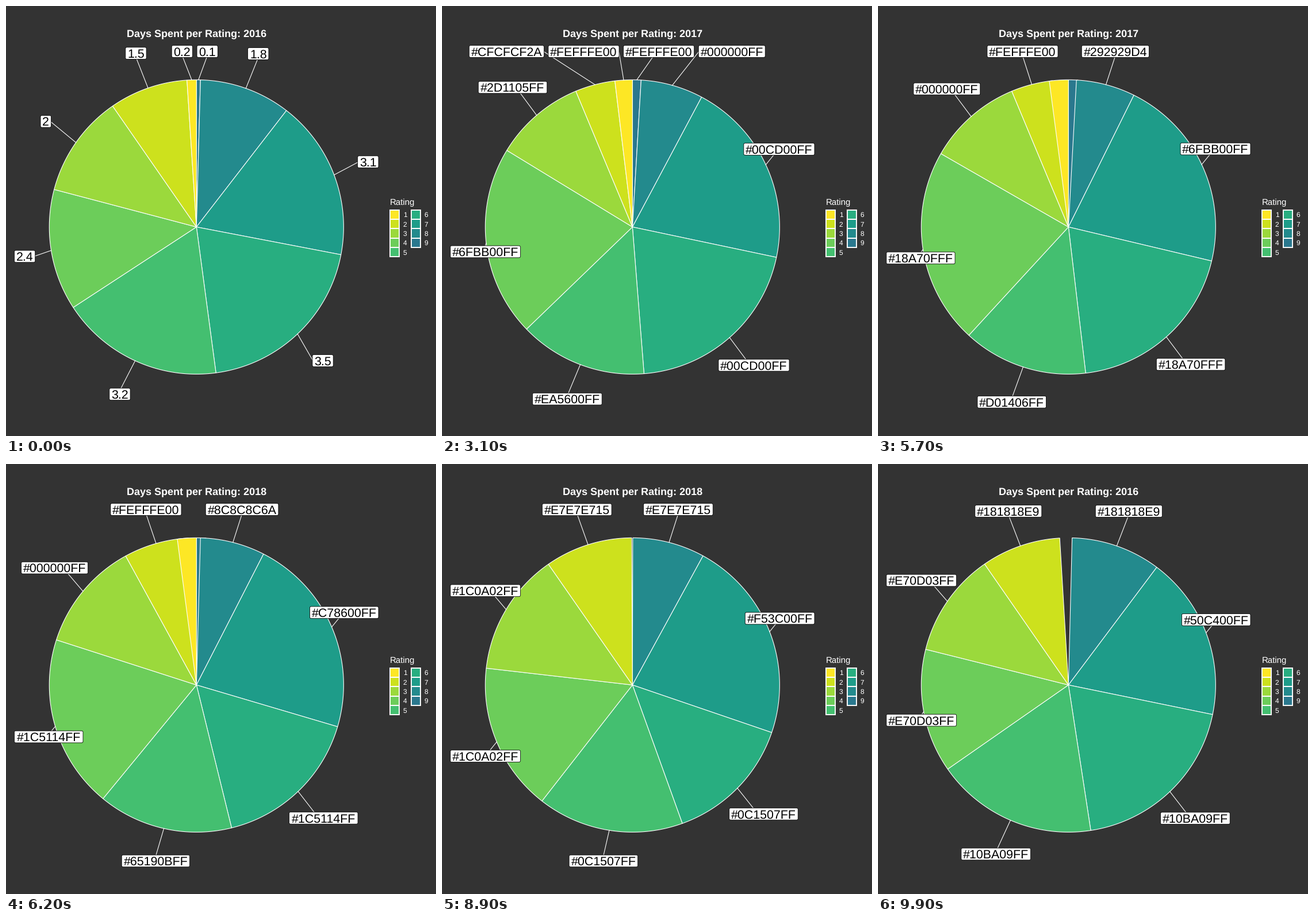
A matplotlib script that plays this animation: 748x748 px, repeating every 10 s.

```python
import numpy as np
import matplotlib.pyplot as plt
from matplotlib.animation import FuncAnimation
from matplotlib.patches import FancyBboxPatch, Polygon, Rectangle

plt.rcParams["text.hinting"] = "none"

SIZE, DPI, FRAMES, INTERVAL = 748, 100, 100, 100
PX = 72 / DPI                      # points per pixel
CX, CY, R = 331.3, 384.4, 256
FONT = "Liberation Sans"
EM, PAD, BOX_H = 21.4, 3.3, 20.8   # label text size, side padding, box height
GAP, CLEARANCE = 7.5, 15           # between labels, between label centre and its point
LEFT, RIGHT, TOP, BOTTOM = 14.4, 648, 79, 690.5

# Days per year for ratings 9 down to 1; zero means no slice.
RATINGS = range(9, 0, -1)
DAYS = {
    2016: (0.077, 1.787, 3.123, 3.537, 3.188, 2.369, 2.003, 1.534, 0.183),
    2017: (0.159, 0.951, 3.230, 3.145, 2.030, 3.435, 1.491, 0.541, 0.318),
    2018: (0, 0.724, 2.125, 1.287, 1.486, 1.549, 1.283, 0.906, 0),
}
YEARS = tuple(DAYS)
EDGES = {y: 360 * np.cumsum((0,) + d) / sum(d) for y, d in DAYS.items()}
COLORS = {r: plt.cm.viridis(1 - 0.075 * (r - 1)) for r in RATINGS}
TWEEN_STARTS, TWEEN_STEPS = (21, 55, 88), 12

# Whole parts of the day counts act as palette indices while tweening.
PALETTE = ((1, 1, 1, 0), (0, 0, 0, 1), (1, 0, 0, 1), (0, 205 / 255, 0, 1))
TO_XYZ = np.array([[0.4124564, 0.3575761, 0.1804375],
                   [0.2126729, 0.7151522, 0.0721750],
                   [0.0193339, 0.1191920, 0.9503041]])
WHITE = TO_XYZ.sum(axis=1)


def to_lab(rgb):
    rgb = np.array(rgb)
    linear = np.where(rgb > 0.04045, ((rgb + 0.055) / 1.055) ** 2.4, rgb / 12.92)
    xyz = TO_XYZ @ linear / WHITE
    x, y, z = np.where(xyz > 0.008856, np.cbrt(xyz), 7.787 * xyz + 16 / 116)
    return np.array([116 * y - 16, 500 * (x - y), 200 * (y - z)])


def from_lab(lab):
    y = (lab[0] + 16) / 116
    f = np.array([y + lab[1] / 500, y, y - lab[2] / 200])
    xyz = np.where(f ** 3 > 0.008856, f ** 3, (f - 16 / 116) / 7.787) * WHITE
    linear = np.clip(np.linalg.solve(TO_XYZ, xyz), 0, 1)
    return np.where(linear > 0.0031308, 1.055 * linear ** (1 / 2.4) - 0.055, 12.92 * linear)


def hex_label(start, end, t):
    a, b = (PALETTE[int(round(days, 1))] for days in (start, end))
    if a == b == PALETTE[0]:
        return "#FEFFFE00"
    rgb = from_lab((1 - t) * to_lab(a[:3]) + t * to_lab(b[:3]))
    alpha = (1 - t) * a[3] + t * b[3]
    return "#" + "".join(f"{int(255 * v + 1e-6):02X}" for v in (*rgb, alpha))


def box_width(text):
    wide = {".": 0.278, "C": 0.722, "D": 0.722, "A": 0.667, "B": 0.667, "E": 0.667, "F": 0.611}
    return EM * sum(wide.get(c, 0.556) for c in text) + 2 * PAD


def polar(deg, radius):
    a = np.radians(deg)
    return CX + radius * np.sin(a), CY - radius * np.cos(a)


def timeline(frame):
    """Return (from year, to year, step); step 0 means at rest."""
    for i, start in enumerate(TWEEN_STARTS):
        if frame < start + TWEEN_STEPS:
            return YEARS[i], YEARS[(i + 1) % 3], max(0, frame - start)


def connect(px, py, x0, y0, x1, y1):
    """Point on the box edge where a leader from (px, py) ends."""
    x, y = np.clip(px, x0, x1), np.clip(py, y0, y1)
    d = np.hypot(px - x, py - y)
    if d == 0:
        return None
    mx, my = (x0 + x1) / 2, (y0 + y1) / 2
    to_mx, to_my = np.hypot(px - mx, py - y), np.hypot(px - x, py - my)
    beside, above = x != px, y != py
    if above and (not beside or to_mx < to_my):
        x += (mx - x) * d / to_mx
    else:
        y += (my - y) * d / to_my
    return x, y


fig = plt.figure(figsize=(SIZE / DPI, SIZE / DPI), dpi=DPI, facecolor="#333333")
ax = fig.add_axes([0, 0, 1, 1])
ax.set_xlim(0, SIZE)
ax.set_ylim(SIZE, 0)
ax.axis("off")


def write(x, y, text, size, **kw):
    return ax.text(x, y, text, fontsize=size * PX, family=FONT, va="baseline", **kw)


title = write(CX, 53.3, "", 18, color="white", weight="bold", ha="center")
write(667.3, 346.3, "Rating", 15, color="white")
for rating in range(1, 10):
    col, row = divmod(rating - 1, 5)
    x, y = 667.6 + 37.2 * col, 354.8 + 16.3 * row
    ax.add_patch(Rectangle((x, y), 16.2, 16.3, fc=COLORS[rating], ec="white", lw=1.9 * PX))
    write(x + 23, y + 12.4, str(rating), 12, color="white")

moving = []


def draw_slice(rating, start, end):
    arc = np.linspace(start, end, int(end - start) + 2)
    points = [(CX, CY)] + [polar(a, R) for a in arc]
    moving.append(ax.add_patch(Polygon(points, fc=COLORS[rating], ec="white", lw=1.1 * PX,
                                       joinstyle="bevel", zorder=2)))


def draw_label(text, x, y, point):
    w = box_width(text)
    x0, y0 = x - w / 2, y - BOX_H / 2
    end = connect(*point, x0, y0, x0 + w, y0 + BOX_H)
    if end:
        moving.extend(ax.plot(*zip(point, end), color="white", lw=1.1 * PX, zorder=3))
    moving.append(ax.add_patch(FancyBboxPatch(
        (x0, y0), w, BOX_H, boxstyle="round,pad=0,rounding_size=2.4",
        fc="white", ec="black", lw=0.8 * PX, zorder=4)))
    moving.append(write(x, y + 7.6, text, EM, color="black", ha="center", zorder=5))


def spread(row, centers, widths):
    """Push neighbours in a row apart until none overlap."""
    for _ in range(200):
        for a, b in zip(row, row[1:]):
            room = (widths[a] + widths[b]) / 2 + GAP
            push = max(0, room - (centers[b][0] - centers[a][0])) / 2
            centers[a][0] -= push
            centers[b][0] += push


def label_centers(mids, texts, step):
    widths = {r: box_width(text) for r, text in texts.items()}
    centers = {}
    for r, w in widths.items():
        px, py = polar(mids[r], R)
        x, y = polar(mids[r], 1.25 * R)
        x = np.clip(x, LEFT + w / 2, RIGHT - w / 2)
        y = np.clip(y, TOP, BOTTOM)
        if abs(x - px) < w / 2 and abs(y - py) < CLEARANCE:
            y = py + np.copysign(CLEARANCE, y - py)
        centers[r] = [x, y]

    row = [r for r in (2, 1, 9, 8) if r in texts]
    spread(row, centers, widths)
    if step and len(row) == 4:
        # A full row slides left while its ends rise level with the rest.
        for r in row:
            centers[r][0] += 5.6 * (6.4 - step)
        for r, rise in ((row[0], 1.1), (row[-1], 3)):
            centers[r][1] = TOP + rise * max(0, 10 - step)
    return centers


def update(frame):
    while moving:
        moving.pop().remove()
    old, new, step = timeline(frame)
    t = step / TWEEN_STEPS
    title.set_text(f"Days Spent per Rating: {new if step >= 6 else old}")

    mids, texts = {}, {}
    for i, r in enumerate(RATINGS):
        start_days, end_days = DAYS[old][i], DAYS[new][i]
        if not start_days:
            continue
        edges = EDGES[old][i:i + 2]
        # A leaving slice keeps its place, without a label, until the tween is over.
        if end_days:
            edges = edges + (EDGES[new][i:i + 2] - edges) * t
        draw_slice(r, *edges)
        if end_days or not step:
            mids[r] = edges.mean()
            texts[r] = hex_label(start_days, end_days, t) if step else f"{round(start_days, 1):g}"

    centers = label_centers(mids, texts, step)
    for r, text in texts.items():
        draw_label(text, *centers[r], polar(mids[r], R))
    return moving


anim = FuncAnimation(fig, update, frames=FRAMES, interval=INTERVAL, repeat=True,
                     repeat_delay=0, blit=False)
plt.show()
```
